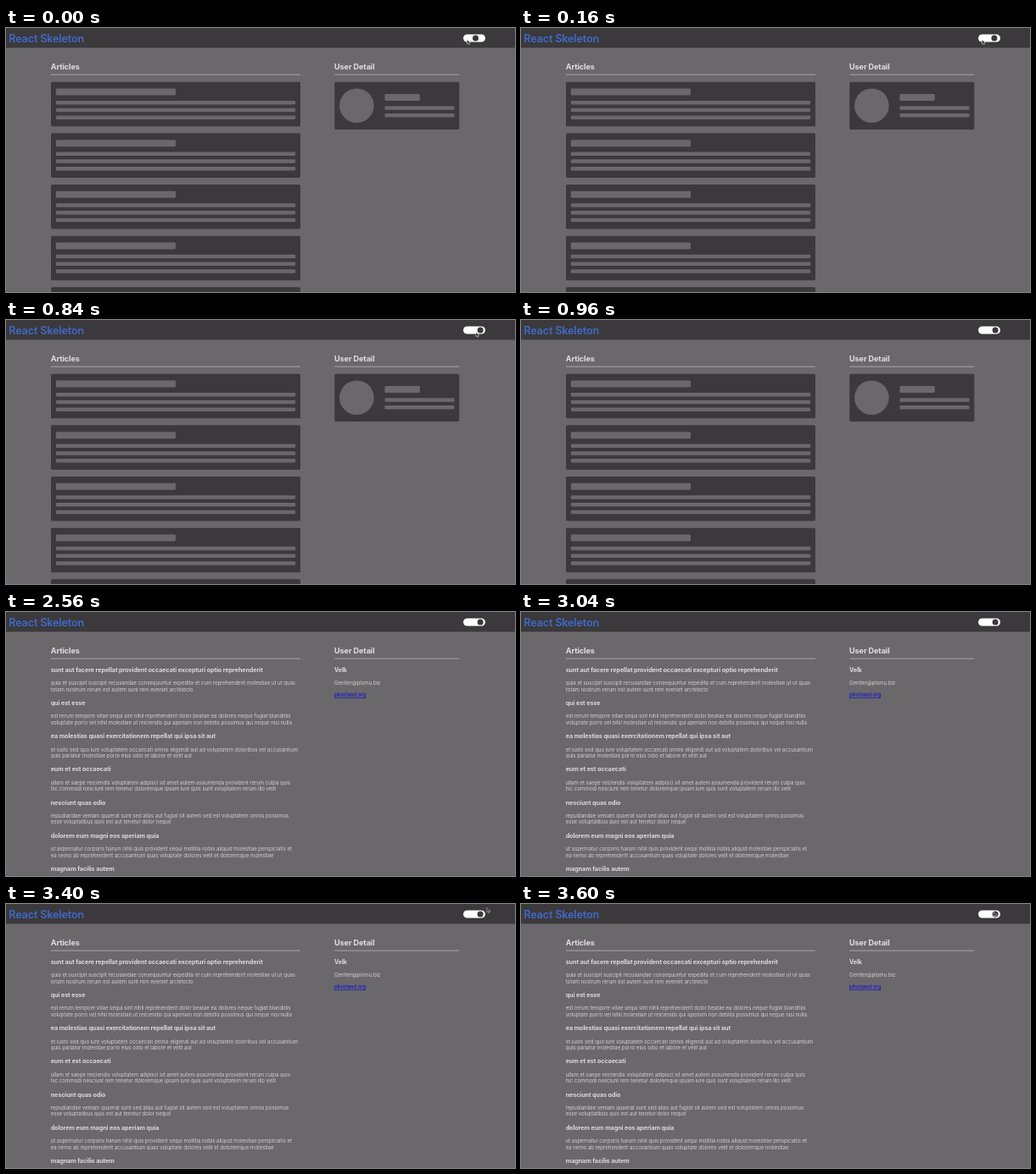
An HTML page for the animation above (3640 ms loop, 600x312 px).

```html
<!DOCTYPE html>
<html lang="en">
<head>
<meta charset="utf-8">
<title>React Skeleton</title>
<style>
  html, body { margin: 0; width: 100%; height: 100%; overflow: hidden; background: #6a686a; }
  svg { display: block; width: 600px; height: 312px; }
  text { font-family: Inter, "Open Sans", sans-serif; letter-spacing: -.012em; white-space: pre; }
  .brand { font-size: 12.6px; font-weight: 600; fill: #4169cb; }
  .heading { font-size: 9.15px; font-weight: 700; fill: #dfdedf; }
  .title { font-size: 7.18px; font-weight: 700; fill: #dad9da; }
  .body { font-size: 6.17px; fill: #d0cfd0; }
  .link { font-size: 6.17px; fill: #0808e0; text-decoration: underline; }
  .panel { fill: #3b393b; }
  .bone { fill: #6a686a; }
</style>
</head>
<body>
<svg id="stage" viewBox="0 0 600 312" xmlns="http://www.w3.org/2000/svg"></svg>
<script>
const LOOP = 3640, TICK = 40;
const LOADED = 2560;

const ARTICLES = [
  ["sunt aut facere repellat provident occaecati excepturi optio reprehenderit",
   "quia et suscipit suscipit recusandae consequuntur expedita et cum reprehenderit molestiae ut ut quas",
   "totam nostrum rerum est autem sunt rem eveniet architecto"],
  ["qui est esse",
   "est rerum tempore vitae sequi sint nihil reprehenderit dolor beatae ea dolores neque fugiat blanditiis",
   "voluptate porro vel nihil molestiae ut reiciendis qui aperiam non debitis possimus qui neque nisi nulla"],
  ["ea molestias quasi exercitationem repellat qui ipsa sit aut",
   "et iusto sed quo iure voluptatem occaecati omnis eligendi aut ad voluptatem doloribus vel accusantium",
   "quis pariatur molestiae porro eius odio et labore et velit aut"],
  ["eum et est occaecati",
   "ullam et saepe reiciendis voluptatem adipisci sit amet autem assumenda provident rerum culpa quis",
   "hic commodi nesciunt rem tenetur doloremque ipsam iure quis sunt voluptatem rerum illo velit"],
  ["nesciunt quas odio",
   "repudiandae veniam quaerat sunt sed alias aut fugiat sit autem sed est voluptatem omnis possimus",
   "esse voluptatibus quis est aut tenetur dolor neque"],
  ["dolorem eum magni eos aperiam quia",
   "ut aspernatur corporis harum nihil quis provident sequi mollitia nobis aliquid molestiae perspiciatis et",
   "ea nemo ab reprehenderit accusantium quas voluptate dolores velit et doloremque molestiae"],
  ["magnam facilis autem"]
];

const stage = document.getElementById("stage");

function add(parent, tag, attrs, content) {
  const node = document.createElementNS("http://www.w3.org/2000/svg", tag);
  for (const key in attrs) node.setAttribute(key, attrs[key]);
  if (content) node.textContent = content;
  parent.appendChild(node);
  return node;
}

const label = (parent, kind, x, y, content) => add(parent, "text", { class: kind, x, y }, content);
const box = (parent, kind, x, y, width, height, rx = 0) =>
  add(parent, "rect", { class: kind, x, y, width, height, rx });

function section(x, width, name) {
  label(stage, "heading", x - .3, 49, name);
  add(stage, "rect", { x, y: 54.7, width, height: .8, fill: "#b5b4b5" });
}

function bones(parent, x, y, titleWidth, lineWidth, lines) {
  box(parent, "bone", x, y, titleWidth, 8, 1.4);
  for (let i = 0; i < lines; i++) box(parent, "bone", x, y + 14.4 + i * 8.75, lineWidth, 4.5, 1.4);
}

box(stage, "panel", 0, 0, 600, 23.4);
label(stage, "brand", 3.3, 17, "React Skeleton");
section(53, 294, "Articles");
section(387.3, 147, "User Detail");

const skeleton = add(stage, "g", {});
for (let i = 0; i < 5; i++) {
  const y = 63.7 + i * 60.65;
  box(skeleton, "panel", 53, y, 294, 52.6, 1.6);
  bones(skeleton, 58.8, y + 7.8, 141.2, 282.4, 3);
}
box(skeleton, "panel", 387.3, 63.7, 147, 56.2, 1.6);
add(skeleton, "circle", { class: "bone", cx: 413.4, cy: 91.7, r: 20.3 });
bones(skeleton, 446.4, 77.9, 41.4, 82.2, 2);

const content = add(stage, "g", {});
ARTICLES.forEach(([title, ...lines], i) => {
  const y = 71 + i * 39.15;
  label(content, "title", 52.7, y, title);
  lines.forEach((line, n) => label(content, "body", 52.7, y + 15.2 + n * 7.6, line));
});
label(content, "title", 387, 71, "Velk");
label(content, "body", 387, 86, "Gentler@plomu.biz");
label(content, "link", 387, 100.3, "pilvotand.org");

add(stage, "rect", { x: 539, y: 7.4, width: 26, height: 9.2, rx: 4.6, fill: "#fff" });
const knob = add(stage, "circle", { class: "panel", cy: 12, r: 3.5 });
const pointer = add(stage, "path", {
  d: "M0 0V5.2L1.2 4.1L2 5.9L2.9 5.5L2.1 3.8H3.7Z",
  fill: "#111", stroke: "#eee", "stroke-width": .55, "stroke-linejoin": "round"
});

// Pointer stops: [time, x, y]; it is hidden between the two visits.
const LEAVING = [[800, 543.4, 13.8], [840, 554, 14.4], [920, 584, 15.8]];
const ARRIVING = [[3120, 593, 3.5], [3240, 578.8, 1.4], [3400, 567, 4.5], [3600, 557.4, 9.6]];

function along(stops, t) {
  if (t <= stops[0][0]) return stops[0].slice(1);
  const next = stops.findIndex(stop => stop[0] >= t);
  const [t0, x0, y0] = stops[next - 1], [t1, x1, y1] = stops[next];
  const p = (t - t0) / (t1 - t0);
  return [x0 + (x1 - x0) * p, y0 + (y1 - y0) * p];
}

function render(t) {
  const loaded = t >= LOADED;
  skeleton.setAttribute("visibility", loaded ? "hidden" : "visible");
  content.setAttribute("visibility", loaded ? "visible" : "hidden");

  const left = 1 - Math.min(t / 400, 1);
  knob.setAttribute("cx", 559.1 - 5.6 * left ** 3);

  const hidden = t >= 960 && t < 3120;
  pointer.setAttribute("visibility", hidden ? "hidden" : "visible");
  if (!hidden) {
    const [x, y] = along(t < 960 ? LEAVING : ARRIVING, t);
    pointer.setAttribute("transform", `translate(${x} ${y})`);
  }
}

const start = performance.now();
function frame() {
  const t = (performance.now() - start) % LOOP;
  render(Math.floor(t / TICK) * TICK);
  requestAnimationFrame(frame);
}
render(0);
requestAnimationFrame(frame);
</script>
</body>
</html>
```
